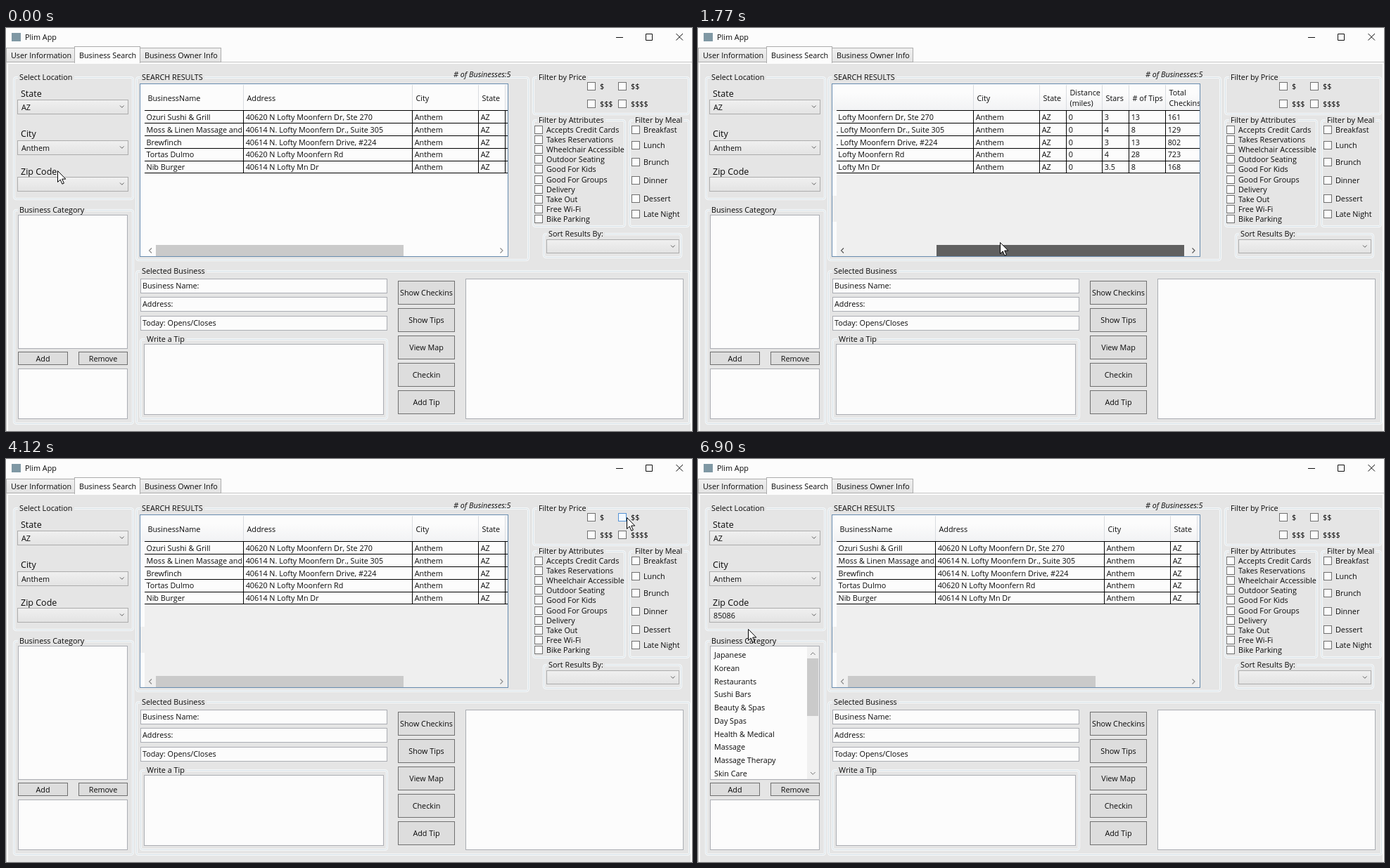
An HTML page that plays this animation: 975x574 px, repeating every 8000 ms.

```html
<!DOCTYPE html>
<html lang="en">
<head>
<meta charset="utf-8">
<title>Business Search</title>
<style>
html, body { margin: 0; width: 100%; height: 100%; overflow: hidden; background: #fcfcfc; }
svg { display: block; width: 975px; height: 574px; }
text { font-family: "Open Sans", "Noto Sans", sans-serif; font-size: 10.8px; fill: #0a0a0a; }
rect, line { shape-rendering: crispEdges; }
.soft { shape-rendering: auto; }
</style>
</head>
<body>
<svg id="stage" viewBox="0 0 975 574">
  <defs>
    <linearGradient id="face" x2="0" y2="1"><stop stop-color="#f0f0f0"/><stop offset="1" stop-color="#e3e3e3"/></linearGradient>
    <linearGradient id="hot" x2="0" y2="1"><stop stop-color="#ecf4fc"/><stop offset="1" stop-color="#dcecfc"/></linearGradient>
    <linearGradient id="head" x2="0" y2="1"><stop offset=".3" stop-color="#fcfcfc"/><stop offset="1" stop-color="#f1f2f4"/></linearGradient>
    <clipPath id="view"><rect x="197" y="80" width="516" height="245"/></clipPath>
    <clipPath id="trailClip"><rect id="trailBox" x="191" y="207" width="0" height="101"/></clipPath>
  </defs>
</svg>
<script>
const NS = "http://www.w3.org/2000/svg";
const LOOP = 8000;
const PAPER = "#fcfcfc", PANEL = "#e5e5e5", GREY = "#efefef", THUMB = "#cacaca";
const stage = document.getElementById("stage");

function add(parent, tag, attrs) {
  const el = document.createElementNS(NS, tag);
  for (const k in attrs) el.setAttribute(k, attrs[k]);
  parent.appendChild(el);
  return el;
}
const set = (el, attrs) => { for (const k in attrs) el.setAttribute(k, attrs[k]); };
const show = (el, on) => el.setAttribute("display", on ? "inline" : "none");
const group = (parent, attrs) => add(parent, "g", attrs);
const fill = (p, x, y, w, h, color) => add(p, "rect", { x, y, width: w, height: h, fill: color });

// Bordered box given by its outer edges
function box(p, x1, y1, x2, y2, color, stroke) {
  return add(p, "rect", { x: x1 + .5, y: y1 + .5, width: x2 - x1, height: y2 - y1, fill: color, stroke });
}
// Text placed by its left edge and vertical middle
function label(p, x, mid, str, attrs) {
  const el = add(p, "text", { x, y: mid + 4, ...attrs });
  el.textContent = str;
  return el;
}
function stroke(p, d, color, width = 1) {
  return add(p, "path", { d, fill: "none", stroke: color, "stroke-width": width });
}
function groupBox(x1, y1, x2, y2, title, tx) {
  for (const [color, width] of [["#f8fafb", 3], ["#d5dfe5", 1]]) {
    add(stage, "rect", { class: "soft", x: x1 + .5, y: y1 + .5, width: x2 - x1, height: y2 - y1,
      rx: 3, fill: "none", stroke: color, "stroke-width": width });
  }
  const back = fill(stage, tx - 2, y1 - 6, 0, 13, PANEL);
  const t = label(stage, tx, y1, title);
  back.setAttribute("width", t.getComputedTextLength() + 4);
}
function combo(x1, y1, x2, y2, str = "") {
  const face = box(stage, x1, y1, x2, y2, "url(#face)", "#acacac");
  const m = y1 + 10;
  stroke(stage, `M${x2 - 11} ${m - 1.5}l2.8 2.8 2.8-2.8`, "#606060");
  return { face, text: label(stage, x1 + 6, m + 1, str) };
}
function button(x1, y1, x2, y2, str) {
  box(stage, x1, y1, x2, y2, "#dddddd", "#707070");
  label(stage, (x1 + x2) / 2 + .5, (y1 + y2) / 2 + .5, str, { "text-anchor": "middle" });
}
function check(x, mid, str, gap) {
  const face = box(stage, x, mid - 6, x + 11, mid + 5, PAPER, "#707070");
  const tick = stroke(stage, `M${x + 2.8} ${mid - .2}l2.6 2.8 4-6`, "#212121", 1.7);
  show(tick, false);
  label(stage, x + gap, mid, str);
  return { face, tick };
}

// Title bar
fill(stage, 0, 0, 975, 574, PAPER);
fill(stage, 8, 7, 13, 12, "#7f98a4");
label(stage, 27, 13, "Plim App");
stroke(stage, "M867 13.5h10M909.5 8.5h9v9h-9z", "#111");
stroke(stage, "M952.5 8l9.5 9.5M962 8l-9.5 9.5", "#111");

// Tabs and page
fill(stage, 0, 48, 975, 526, PAPER);
stroke(stage, "M0 48.5h975M.5 48v526", "#c4c4c4");
fill(stage, 3, 51, 970, 523, PANEL);
box(stage, 0, 28, 97, 48, "url(#face)", "#acacac");
box(stage, 190, 28, 305, 48, "url(#face)", "#acacac");
box(stage, 97, 26, 190, 49, PAPER, "#acacac");
fill(stage, 98, 48, 92, 3, PAPER);
label(stage, 7, 39, "User Information");
label(stage, 104, 39, "Business Search");
label(stage, 197, 39, "Business Owner Info");

// Location
groupBox(11, 70, 180, 243, "Select Location", 19);
[["State", 94], ["City", 151], ["Zip Code", 205]].forEach(([s, y]) => label(stage, 21, y, s, { style: "font-size:12.5px" }));
combo(16, 102, 173, 122, "AZ");
combo(16, 160, 173, 180, "Anthem");
const zip = combo(16, 212, 173, 232);

// Categories
groupBox(11, 259, 180, 563, "Business Category", 19);
box(stage, 17, 266, 172, 456, PAPER, "#abadb3");
const cats = group(stage);
["Japanese", "Korean", "Restaurants", "Sushi Bars", "Beauty & Spas", "Day Spas", "Health & Medical", "Massage",
  "Massage Therapy", "Skin Care"].forEach((s, i) => label(cats, 23, 279 + 18.75 * i, s));
fill(cats, 155, 267, 17, 189, "#f0f0f0");
fill(cats, 155, 284, 16, 82, THUMB);
stroke(cats, "M160 279l3.3-3.3 3.3 3.3M160 446l3.3 3.3 3.3-3.3", "#777");
button(17, 461, 87, 479, "Add");
button(103, 461, 172, 479, "Remove");
box(stage, 17, 485, 172, 556, PAPER, "#abadb3");

// Results table
groupBox(185, 70, 742, 330, "SEARCH RESULTS", 193);
const count = label(stage, 636, 66, "", { "font-style": "italic" });
box(stage, 190, 79, 713, 325, PAPER, "#688caf");
const trail = add(stage, "path", {
  d: "M191 239h24v20h35v15h22v10h18v8h17v16h-47v-6h-21v-10h-36v-16h-12z",
  fill: GREY, "clip-path": "url(#trailClip)"
});
const shade = group(stage);
fill(shade, 197, 118, 516, 89, "#f8f8f8");
fill(shade, 197, 207, 516, 118, GREY);
fill(shade, 191, 239, 6, 37, GREY);
fill(shade, 191, 81, 522, 37, "url(#head)");
const view = group(stage, { "clip-path": "url(#view)" });
const sheet = group(view);
const edges = [337, 577, 671, 709, 760, 798, 850];
const starts = [197, ...edges.map(x => x + 1)];
["BusinessName", "Address", "City", "State", "Distance|(miles)", "Stars", "# of Tips", "Total|Checkins"].forEach((s, c) => {
  const lines = s.split("|");
  lines.forEach((line, i) => label(sheet, starts[c] + 4.5, lines.length > 1 ? 92 + 15 * i : 100, line));
});
edges.forEach(x => fill(sheet, x, 81, 1, 37, "#d9dce0"));
const STEP = 17.8, TOP = 117.4, END = 900;
const rows = [
  ["Ozuri Sushi & Grill", "40620 N Lofty Moonfern Dr, Ste 270", 3, 13, 161],
  ["Moss & Linen Massage and", "40614 N. Lofty Moonfern Dr., Suite 305", 4, 8, 129],
  ["Brewfinch", "40614 N. Lofty Moonfern Drive, #224", 3, 13, 802],
  ["Tortas Dulmo", "40620 N Lofty Moonfern Rd", 4, 28, 723],
  ["Nib Burger", "40614 N Lofty Mn Dr", 3.5, 8, 168]
].map(([name, street, ...nums]) => {
  const g = group(sheet);
  fill(g, 197, 0, END - 197, STEP, PAPER);
  label(g, 199.5, 9.7, name);
  fill(g, 335, 0, END - 335, STEP, PAPER);
  [street, "Anthem", "AZ", 0, ...nums].forEach((v, i) => label(g, starts[i + 1] + 2.7, 9.7, v));
  edges.forEach(x => fill(g, x, 0, 1, STEP, "#000"));
  fill(g, 197, 0, END - 197, 1, "#000");
  return g;
});
const lastLine = fill(sheet, 197, 0, END - 197, 1, "#000");
const thumb = fill(view, 213, 309, 352, 16, THUMB);
const arrows = stroke(view, "M207 313.5l-3.5 3.5 3.5 3.5M702.5 313.5l3.5 3.5-3.5 3.5", "#888", 1.1);

// Filters
groupBox(749, 70, 970, 122, "Filter by Price", 757);
const prices = [[826, 83, "$"], [870, 83, "$$"], [826, 108, "$$$"], [870, 108, "$$$$"]]
  .map(([x, y, s]) => ({ x, y, ...check(x, y, s, 18) }));
groupBox(749, 131, 879, 282, "Filter by Attributes", 757);
["Accepts Credit Cards", "Takes Reservations", "Wheelchair Accessible", "Outdoor Seating", "Good For Kids",
  "Good For Groups", "Delivery", "Take Out", "Free Wi-Fi", "Bike Parking"]
  .forEach((s, i) => check(751, Math.round(145 + 14.1 * i), s, 17));
groupBox(886, 131, 970, 282, "Filter by Meal", 894);
[["Breakfast", 145], ["Lunch", 167], ["Brunch", 191], ["Dinner", 217], ["Dessert", 243], ["Late Night", 265]]
  .forEach(([s, y]) => check(889, y, s, 17));
groupBox(764, 293, 959, 326, "Sort Results By:", 771);
combo(768, 301, 956, 320);

// Selected business
groupBox(185, 346, 971, 563, "Selected Business", 193);
[["Business Name:", 357], ["Address:", 383], ["Today: Opens/Closes", 410]].forEach(([s, y]) => {
  box(stage, 191, y, 541, y + 20, PAPER, "#abadb3");
  label(stage, 194, y + 9.5, s);
});
groupBox(191, 443, 541, 556, "Write a Tip", 200);
box(stage, 196, 450, 536, 550, PAPER, "#abadb3");
["Show Checkins", "Show Tips", "View Map", "Checkin", "Add Tip"].forEach((s, i) => {
  const y = Math.round(360 + 38.9 * i);
  button(557, y, 637, y + 33, s);
});
box(stage, 653, 357, 962, 556, PAPER, "#abadb3");

// Zip drop-down
const popup = group(stage);
box(popup, 17, 233, 172, 253, PAPER, "#8a8a8a");
const popupItem = fill(popup, 19, 235, 153, 17, "#cfe6f7");
label(popup, 23, 244, "85086");

const pointer = add(stage, "path", {
  d: "M.5 .5v16l3.7-3.5 2.7 6.2 2.5-1.1-2.7-6h5.1z", fill: "#fff", stroke: "#000", "stroke-linejoin": "miter"
});

const ease = {
  both: u => u * u * (3 - 2 * u),
  in: u => u * u,
  out: u => 1 - (1 - u) ** 2
};
// Pointer stops: time, x, y, easing towards the stop
const stops = [
  [0, 73, 203], [600, 73, 203], [1080, 296, 305], [1200, 303, 311], [1770, 429, 305], [2000, 303, 309],
  [2160, 477, 218, "in"], [2660, 844, 85, "out"], [3330, 844, 85], [3520, 874, 86], [3740, 838, 85],
  [3890, 838, 85], [4150, 884, 83], [4580, 884, 83], [4690, 874, 83], [5490, 874, 83], [6210, 110, 222],
  [6320, 92, 245], [6430, 82, 275], [6550, 71, 242], [LOOP, 71, 242]
];
function pointerAt(t) {
  const i = Math.max(1, stops.findIndex(s => s[0] > t));
  const [t0, x0, y0] = stops[i - 1], [t1, x1, y1, kind = "both"] = stops[i];
  const u = ease[kind]((t - t0) / (t1 - t0));
  return [x0 + (x1 - x0) * u, y0 + (y1 - y0) * u];
}
const between = (t, a, b) => t >= a && t < b;

function draw(t) {
  const [x, y] = pointerAt(t);
  const over = (x1, y1, x2, y2) => x >= x1 && x <= x2 && y >= y1 && y <= y2;
  pointer.setAttribute("transform", `translate(${Math.round(x)} ${Math.round(y)})`);

  const dragging = between(t, 1200, 2000);
  const shift = dragging ? Math.max(0, Math.round(x - 303)) : 0;
  sheet.setAttribute("transform", `translate(${-Math.round(shift * 186 / 126)} 0)`);
  set(thumb, { x: 213 + shift, fill: dragging ? "#606060" : THUMB });
  arrows.setAttribute("stroke", dragging ? "#505050" : "#888");
  show(shade, t >= 1200);
  show(trail, t < 1200);
  document.getElementById("trailBox").setAttribute("width", Math.max(0, x + 11 - 191));

  const cheap = between(t, 2700, 3890), mid = between(t, 4300, 5030);
  const list = cheap ? [2, 3] : between(t, 4300, 5150) ? [0, 4] : [0, 1, 2, 3, 4];
  rows.forEach((g, i) => {
    const at = list.indexOf(i);
    show(g, at >= 0);
    g.setAttribute("transform", `translate(0 ${TOP + STEP * at})`);
  });
  lastLine.setAttribute("y", TOP + STEP * list.length);
  count.textContent = "# of Businesses:" + list.length;

  const chosen = cheap ? 0 : mid ? 1 : -1;
  prices.forEach((p, i) => {
    const off = chosen >= 0 && i !== chosen;
    const hot = !off && over(p.x, p.y - 7, p.x + 30, p.y + 6);
    set(p.face, { fill: off ? "#e6e6e6" : hot ? "#f3f9ff" : PAPER, stroke: off ? "#bcbcbc" : hot ? "#5593d5" : "#707070" });
    show(p.tick, i === chosen);
  });

  const open = between(t, 6230, 6730);
  const hot = open || over(16, 212, 173, 232);
  set(zip.face, { fill: hot ? "url(#hot)" : "url(#face)", stroke: hot ? "#7eb4ea" : "#acacac" });
  zip.text.textContent = t >= 6700 ? "85086" : "";
  show(popup, open);
  show(popupItem, over(17, 233, 173, 254));
  show(cats, t >= 6850);
}

const start = performance.now();
function tick() {
  draw((performance.now() - start) % LOOP);
  requestAnimationFrame(tick);
}
tick();
</script>
</body>
</html>
```
